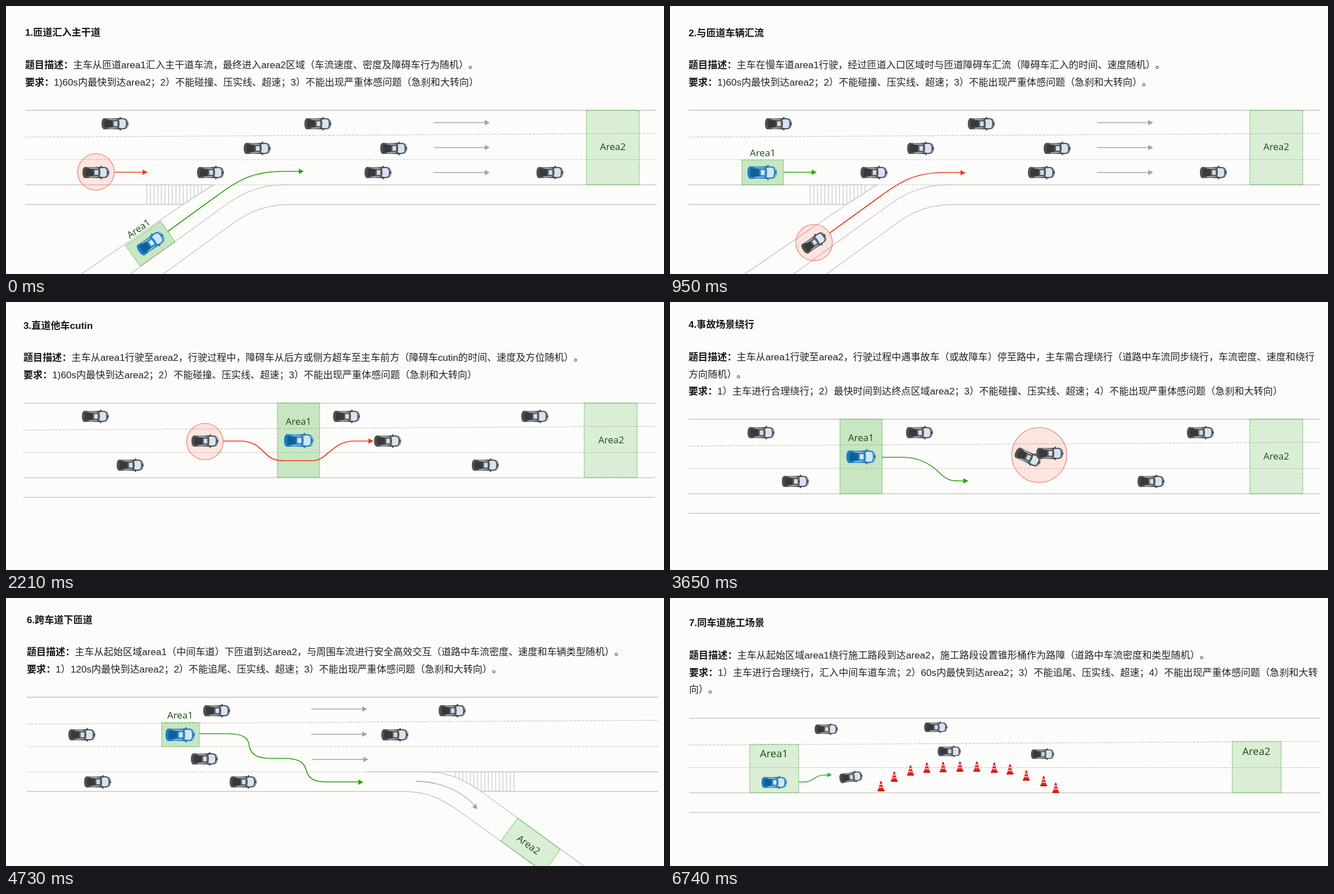
Recreate the animation shown at these times as an HTML page. Size 1171 px wide and 478 px high, loop 6800 ms.

```html
<!DOCTYPE html>
<html lang="zh-CN">
<head>
<meta charset="utf-8">
<title>驾驶场景</title>
<style>
  html, body { margin: 0; width: 100%; height: 100%; overflow: hidden; background: #fcfdfa; }
  svg { display: block; width: 1171px; height: 478px; }
  text { font: 17.12px "Liberation Sans", "Noto Sans CJK SC", "Noto Sans CJK", sans-serif; fill: #222; text-spacing-trim: space-all; }
  .b { font-weight: 700; fill: #151515; }
  .area { font: 500 17px "Open Sans", sans-serif; fill: #1f4d16; text-anchor: middle; }
  .road { fill: none; stroke: #c6c6ca; stroke-width: 1.5; }
  .lane { stroke-dasharray: 5 2; stroke-width: 1.2; }
  .hatch { stroke-width: 1.2; }
</style>
</head>
<body>
<svg id="stage" viewBox="0 0 1171 478">
  <defs>
    <g id="shape">
      <path d="M6 -9L9 -12H11L10 -8ZM6 9L9 12H11L10 8Z"/>
      <path d="M-20 -10Q-5 -9 4 -10H15Q24 -9 24 0Q24 9 15 10H4Q-5 9 -20 10Q-24 8 -24 0Q-24 -8 -20 -10Z"/>
    </g>
    <g id="glass">
      <path d="M7 -7Q13 -9 18 -7Q21 0 18 7Q13 9 7 7Q9 0 7 -7Z" fill="#d5e4f2"/>
      <path d="M-13 -8.5L5 -8L3 -6.5H-10ZM-13 8.5L5 8L3 6.5H-10Z" fill="#aebac4"/>
      <path d="M20 -7Q23 -4 22.5 -2M20 7Q23 4 22.5 2" fill="none" stroke="#e4ebf0"/>
    </g>
    <g id="dark">
      <use href="#shape" fill="#505052"/>
      <use href="#glass"/>
      <rect x="-19" y="-6.5" width="14" height="13" rx="2" fill="#39393b"/>
      <rect x="-4" y="-5.5" width="10" height="11" rx="1.5" fill="#66676a"/>
      <rect x="-2" y="-4" width="6" height="8" fill="#d3dee8"/>
    </g>
    <g id="blue" transform="scale(1.09 1.13)">
      <use href="#shape" fill="#1c7fc2"/>
      <use href="#glass"/>
      <rect x="-19" y="-6.5" width="14" height="13" rx="2" fill="#0f5f9f"/>
      <rect x="-4" y="-5.5" width="10" height="11" rx="1.5" fill="#2c8fd0"/>
      <rect x="-2" y="-4" width="6" height="8" fill="#d6ebf8"/>
    </g>
    <g id="cone">
      <path d="M-1 -9.5H1L5 6.5H-5Z" fill="#ec1c1c"/>
      <path d="M-2 -4.5H2L2.5 -2.5H-2.5ZM-3.2 .8H3.2L3.6 2.4H-3.6Z" fill="#fbdcd8"/>
      <rect x="-6" y="6" width="12" height="2.8" fill="#d31212"/>
    </g>
  </defs>
</svg>
<script>
const LOOP = 6800;
const GREEN = '#2fa314', RED = '#f0391d', GRAY = '#a3a3a6';

const path = (d, cls = '') => `<path class="road ${cls}" d="${d}"/>`;

const use = (id, x, y, turn = 0, size = 1) =>
  `<use href="#${id}" transform="translate(${x} ${y}) rotate(${turn}) scale(${size})"/>`;

const cars = (list, size = 1) => list.map(([x, y, turn]) => use('dark', x, y, turn, size)).join('');

const label = (name, x, y, turn = 0, size = 17) =>
  `<text class="area" style="font-size:${size}px" transform="translate(${x} ${y}) rotate(${turn})" y="6">${name}</text>`;

const zone = (x, y, w, h, alpha = .2, turn = 0) =>
  `<rect x="${-w / 2}" y="${-h / 2}" width="${w}" height="${h}" transform="translate(${x + w / 2} ${y + h / 2}) rotate(${turn})"
    fill="rgba(76,175,60,${alpha})" stroke="#5dbb50" stroke-width="1.1" stroke-dasharray="3 1.5"/>`;

const ring = (x, y, r) =>
  `<circle cx="${x}" cy="${y}" r="${r}" fill="rgba(255,70,45,.13)" stroke="#ee6f60" stroke-width="1.1"/>`;

// Curve that ends in a triangular head at (x, y).
const arrow = (d, x, y, color, turn = 0, width = 1.7, size = 1) =>
  `<path d="${d}" fill="none" stroke="${color}" stroke-width="${width}"/>
   <path d="M0 0L-9 -4.7V4.7Z" fill="${color}" transform="translate(${x} ${y}) rotate(${turn}) scale(${size})"/>`;

const straight = (x1, x2, y, color, width) => arrow(`M${x1} ${y}H${x2 - 7}`, x2, y, color, 0, width);
const grayArrows = list => list.map(([x, y]) => straight(x, x + 100, y, GRAY, 1.3)).join('');

// Vertical strokes from y down to the limit given by a function of x.
function hatch(x1, x2, y, limit) {
  let d = '';
  for (let x = x1; x <= x2; x += 6.5) d += `M${x} ${y}V${Math.min(y + 35, limit(x))}`;
  return path(d, 'hatch');
}

// Heading and paragraphs; a leading "key：" is set in bold.
function copy(x, y, title, ...lines) {
  const rows = lines.map((s, i) => {
    const key = /^(题目描述：|要求：)/.exec(s);
    const body = key ? `<tspan class="b">${key[0]}</tspan>${s.slice(key[0].length)}` : s;
    return `<text x="${x}" y="${y + 57.4 + i * 30.8}">${body}</text>`;
  });
  return `<text class="b" x="${x}" y="${y}">${title}</text>` + rows.join('');
}

const lanes = (x, y) =>
  path(`M${x} ${y}h1124`) +
  path(`M${x} ${y + 48}l1124 -7M${x} ${y + 88}h1124`, 'lane');

const straightRoad = (x, y) => lanes(x, y) + path(`M${x} ${y + 133}h1124M${x} ${y + 168}h1124`);

const mergeRoad = () => lanes(34, 186) +
  path('M34 319H369M490 319H1158M34 354H315M369 319L315 354L126 483.5') +
  path('M369 319H490', 'lane') +
  path('M214 483L392 354C424 331 455 319 495 319M273 483L398 392C426 371 457 354 505 354H1158') +
  hatch(250.5, 352, 319, x => 319 + (369 - x) * .66);

const exitRoad = () => lanes(37, 177) +
  path('M37 310H640', 'lane') +
  path('M640 310H1161M37 345H705C750 345 775 358 805 379L952 485M845 345H1161M740 310C790 310 815 324 848 347L1038 485') +
  hatch(800, 905, 310, x => 320 + (x - 800) * .57);

const traffic = cars([[194, 210], [555, 210], [447, 254], [690, 254], [364, 297], [662, 297], [968, 297]]);
const mergeArrows = grayArrows([[761, 208], [761, 252.5], [761, 297]]);
const mergeBase = mergeRoad() + zone(1033, 186, 94, 133) + label('Area2', 1080, 251) + traffic + mergeArrows;

const cones = [[375.5, 336], [399, 319], [428, 308], [457, 303], [486, 302], [516, 301],
  [546, 301], [577, 303], [605, 306], [634, 317], [665, 327], [686.5, 339]];

const scenes = [
  [0, copy(34, 53.3, '1.匝道汇入主干道',
      '题目描述：主车从匝道area1汇入主干道车流，最终进入area2区域（车流速度、密度及障碍车行为随机）。',
      '要求：1)60s内最快到达area2；2）不能碰撞、压实线、超速；3）不能出现严重体感问题（急刹和大转向）') +
    mergeBase + ring(160, 296, 32.5) + cars([[160, 297]]) + straight(193, 252, 296.5, RED) +
    zone(219, 401.5, 76, 45, .3, -35) + label('Area1', 236, 397, -35) + use('blue', 258, 423, -35) +
    arrow('M288 402L376 338C414 310 440 295 492 295H522', 530, 295, GREEN)],

  [950, copy(33, 53.8, '2.与匝道车辆汇流',
      '题目描述：主车在慢车道area1行驶，经过匝道入口区域时与匝道障碍车汇流（障碍车汇入的时间、速度随机）。',
      '要求：1)60s内最快到达area2；2）不能碰撞、压实线、超速；3）不能出现严重体感问题（急刹和大转向）。') +
    `<g transform="translate(-1 0)">${mergeBase}</g>` +
    zone(128, 274.5, 74, 44.5, .3) + label('Area1', 165, 262) + use('blue', 164, 297) +
    straight(202, 261, 296.5, GREEN) + ring(256.5, 422, 32.5) + cars([[256.5, 422, -35]]) +
    arrow('M284 405L372 341C410 313 436 297 488 297H518', 526, 297.5, RED)],

  [2210, copy(31, 47.8, '3.直道他车cutin',
      '题目描述：主车从area1行驶至area2，行驶过程中，障碍车从后方或侧方超车至主车前方（障碍车cutin的时间、速度及方位随机）。',
      '要求：1)60s内最快到达area2；2）不能碰撞、压实线、超速；3）不能出现严重体感问题（急刹和大转向）') +
    straightRoad(31, 180.5) + zone(483, 180, 75, 133, .3) + label('Area1', 520.5, 213) +
    zone(1029, 180, 94, 133) + label('Area2', 1077, 246) + ring(354, 249, 32.5) +
    cars([[159, 204], [606, 204], [941, 204], [354, 248], [679, 248], [221, 291], [853, 291]]) +
    use('blue', 521, 247) +
    arrow('M387 248H415C445 248 452 262 466 274C474 281 482 283 494 283H545C560 283 566 275 576 267C590 255 600 248 622 248H646', 654, 248, RED)],

  [3650, copy(33, 46.3, '4.事故场景绕行',
      '题目描述：主车从area1行驶至area2，行驶过程中遇事故车（或故障车）停至路中，主车需合理绕行（道路中车流同步绕行，车流密度、速度和绕行',
      '方向随机）。',
      '要求：1）主车进行合理绕行；2）最快时间到达终点区域area2；3）不能碰撞、压实线、超速；4）不能出现严重体感问题（急刹和大转向）') +
    straightRoad(33, 209) + zone(302.5, 209, 75, 133, .3) + label('Area1', 340, 242) +
    zone(1032, 209, 94, 133) + label('Area2', 1079, 275) + ring(657, 273, 49) +
    cars([[162, 233], [444, 233], [944, 233], [223, 320], [856, 320], [637, 277, 25], [676, 270]]) +
    use('blue', 340, 276) +
    arrow('M377 277H415C445 277 465 290 480 305C492 317 500 319 512 319H523', 531, 319, GREEN)],

  [4730, copy(37, 44.6, '6.跨车道下匝道',
      '题目描述：主车从起始区域area1（中间车道）下匝道到达area2，与周围车流进行安全高效交互（道路中车流密度、速度和车辆类型随机）。',
      '要求：1）120s内最快到达area2；2）不能追尾、压实线、超速；3）不能出现严重体感问题（急刹和大转向）。') +
    exitRoad() + zone(277, 222, 67, 43, .3) + label('Area1', 310, 209) +
    zone(886.3, 415.7, 94.4, 50.6, .2, 36.4) + label('Area2', 930, 440, 36.4) +
    cars([[375, 201], [794, 201], [135, 244], [692, 244], [353, 287], [163, 328], [422, 328]]) +
    use('blue', 310, 244) + grayArrows([[543, 198], [543, 243], [545, 288]]) +
    arrow('M729 327C770 327 808 342 834 370', 839, 377, GRAY, 50, 1.3) +
    arrow('M344 242H395C425 242 432 252 433 264C436 282 452 286 470 286H495C525 286 531 296 534 306C538 322 548 328 570 328H628', 636, 328.5, GREEN)],

  [5860, copy(34, 50.4, '7.同车道施工场景',
      '题目描述：主车从起始区域area1绕行施工路段到达area2，施工路段设置锥形桶作为路障（道路中车流密度和类型随机）。',
      '要求：1）主车进行合理绕行，汇入中间车道车流；2）60s内最快到达area2；3）不能追尾、压实线、超速；4）不能出现严重体感问题（急刹和大转',
      '向）。') +
    straightRoad(34, 214.5) + zone(142, 261, 87, 86.5) + label('Area1', 185, 278, 0, 18.4) +
    zone(1000.5, 256, 87, 91.5) + label('Area2', 1043.5, 273.5, 0, 18.4) +
    cars([[278, 234], [473, 230.5], [497, 273.5], [663, 278.5], [322, 319.5, -8]], .86) +
    use('blue', 185.5, 329, 0, .86) +
    cones.map(([x, y]) => use('cone', x, y)).join('') +
    arrow('M229 328C262 331 250 314 281 316', 288, 315.5, '#27a94a', 0, 1.5, .85)]
];

const stage = document.getElementById('stage');
stage.insertAdjacentHTML('beforeend', scenes.map(([, body]) => `<g class="scene">${body}</g>`).join(''));
const groups = [...stage.querySelectorAll('.scene')];

function draw(t) {
  const current = scenes.filter(([start]) => t >= start).length - 1;
  groups.forEach((g, i) => { g.style.display = i === current ? '' : 'none'; });
}

function tick() {
  draw(performance.now() % LOOP);
  requestAnimationFrame(tick);
}
tick();
</script>
</body>
</html>
```
